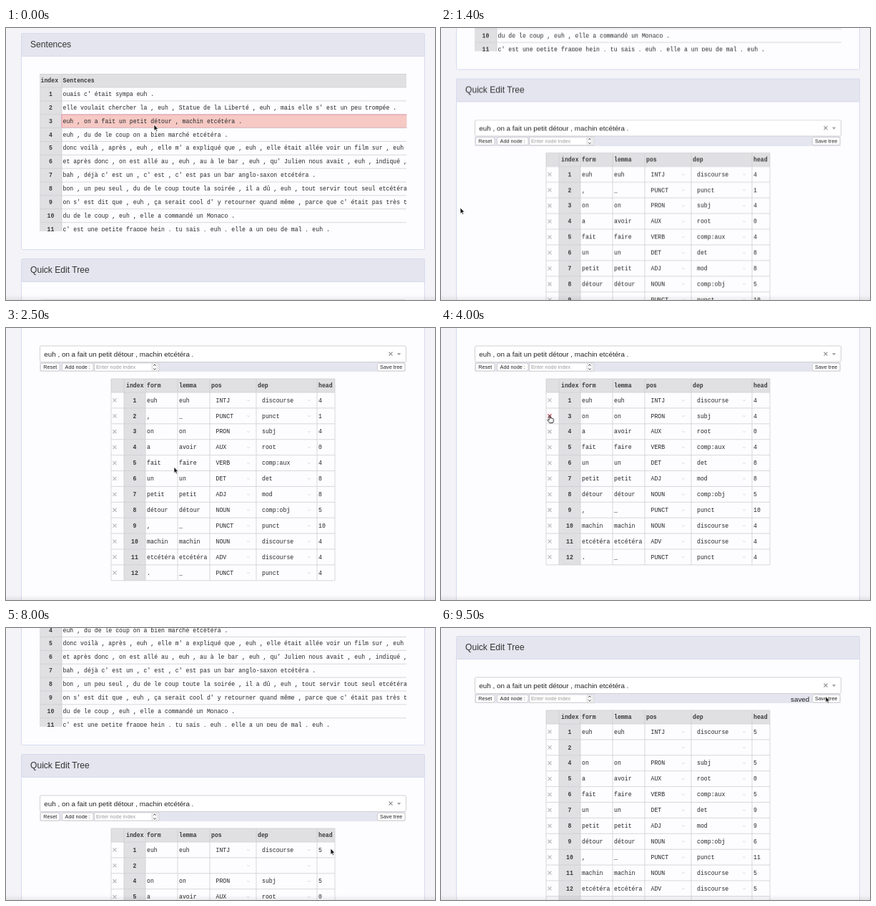
Animation, 600 px wide and 380 px high, one loop 10 s. Source, as an HTML page:

```html
<!DOCTYPE html>
<html lang="fr">
<head>
<meta charset="utf-8">
<title>Quick Edit Tree</title>
<style>
  html, body { margin: 0; width: 100%; height: 100%; overflow: hidden; background: #f4f3f7; }
  svg { display: block; width: 600px; height: 380px; }
  text { font: 8.2px "Liberation Mono", "Courier New", monospace; fill: #262626; white-space: pre; }
  .bold { font-weight: bold; fill: #3a3a3a; }
  .mid { text-anchor: middle; }
  .title { font: 12.1px "Liberation Sans", Arial, sans-serif; fill: #333; }
  .value { font: 9.85px "Liberation Sans", Arial, sans-serif; fill: #222; }
  .small { font: 7.3px "Liberation Sans", Arial, sans-serif; fill: #222; }
  .hint { fill: #999; }
  .panel { fill: #fdfcfe; stroke: #d6daee; }
  .head { fill: #e4e5ee; stroke: #d6daee; }
  .gray { fill: #e0dfe2; }
  .line { fill: none; stroke: #cfced2; stroke-width: .8; }
  .box { fill: #fff; stroke: #c6c6ca; stroke-width: .8; }
  .cross { fill: none; stroke: #b9b8bb; stroke-width: 1.2; }
  .caret { fill: none; stroke: #d5d4d8; stroke-width: .8; }
  .dark { stroke: #8e8e92; }
  .red { stroke: #d8485c; }
</style>
</head>
<body>
<svg id="stage" viewBox="0 0 600 380"></svg>
<script>
const sentences = [
  "ouais c' était sympa euh .",
  "elle voulait chercher la , euh , Statue de la Liberté , euh , mais elle s' est un peu trompée .",
  "euh , on a fait un petit détour , machin etcétéra .",
  "euh , du de le coup on a bien marché etcétéra .",
  "donc voilà , après , euh , elle m' a expliqué que , euh , elle était allée voir un film sur , euh",
  "et après donc , on est allé au , euh , au à le bar , euh , qu' Julien nous avait , euh , indiqué ,",
  "bah , déjà c' est un , c' est , c' est pas un bar anglo-saxon etcétéra .",
  "bon , un peu seul , du de le coup toute la soirée , il a dû , euh , tout servir tout seul etcétéra",
  "on s' est dit que , euh , ça serait cool d' y retourner quand même , parce que c' était pas très t",
  "du de le coup , euh , elle a commandé un Monaco .",
  "c' est une petite frappe hein , tu sais , euh , elle a un peu de mal , euh ."
];

// index, form, lemma, pos, dep, head
const nodes = `1 euh euh INTJ discourse 4
2 , _ PUNCT punct 1
3 on on PRON subj 4
4 a avoir AUX root 0
5 fait faire VERB comp:aux 4
6 un un DET det 8
7 petit petit ADJ mod 8
8 détour détour NOUN comp:obj 5
9 , _ PUNCT punct 10
10 machin machin NOUN discourse 4
11 etcétéra etcétéra ADV discourse 4
12 . _ PUNCT punct 4`.split("\n").map(row => row.split(" "));

const shift = n => +n > 1 ? +n + 1 : n;
const removed = nodes.filter(node => node[0] !== "2");
const inserted = removed.map(([index, ...rest]) => [shift(index), ...rest.slice(0, 4), shift(rest[4])]);
inserted.splice(1, 0, [2, "", "", "", "", ""]);

const text = (x, y, str, cls = "") => `<text x="${x}" y="${y}" class="${cls}">${str}</text>`;
const rect = (x, y, w, h, cls, r = 0) =>
  `<rect x="${x}" y="${y}" width="${w}" height="${h}" rx="${r}" class="${cls}"/>`;
const path = (d, cls, extra = "") => `<path d="${d}" class="${cls}" ${extra}/>`;
const group = (id, body) => `<g id="${id}">${body}</g>`;
const cross = (x, y, cls = "") => path(`M${x - 2.5} ${y - 2.5}l5 5m0-5l-5 5`, "cross " + cls);
const button = (x, w, label) =>
  rect(x, 404.2, w, 10.8, "box", 2.5) + text(x + w / 2, 412.3, label, "small mid");

function panel(y, bottom, title) {
  return rect(21.5, y + .5, 564, bottom - y, "panel", 2) +
    rect(21.5, y + .5, 564, 32, "head", 2) + text(34, y + 20.3, title, "title");
}

function sentenceTable() {
  const pitch = 18.87;
  let out = rect(47, 64, 513, 19, "gray") + rect(47, 83, 31, 201, "gray") +
    text(48.5, 76, "index", "bold") + text(79.5, 76, "Sentences", "bold") +
    path("M47 64.4H560M78 64V284", "line");
  sentences.forEach((sentence, i) => {
    const y = 83 + i * pitch;
    out += path(`M47 ${y}H560`, "line") +
      (i === 2 ? `<rect x="78" y="${y + .3}" width="490" height="${pitch - .6}" fill="#f6c9c4" stroke="#e58fae" stroke-width=".9"/>` : "") +
      text(62.5, y + 12, i + 1, "bold mid") + text(79.5, y + 12, sentence);
  });
  return `<g clip-path="url(#list)">${out}</g>`;
}

function treeTable(id, rows) {
  const pitch = 21.9, top = 445, bottom = top + rows.length * pitch;
  const columns = [147, 165, 195, 240, 285, 350, 435, 460];
  const heads = [[168, "index"], [197, "form"], [242, "lemma"], [287, "pos"], [352, "dep"], [437, "head"]];
  const cellX = [180, 197, 242, 293.5, 358, 437];
  let out = rect(147, 426, 313, 19, "gray") + rect(165, 445, 30, bottom - top, "gray") +
    heads.map(([x, label]) => text(x, 438.2, label, "bold")).join("") +
    columns.map(x => path(`M${x} 426V${bottom}`, "line")).join("") +
    path(`M147 426H460M147 ${bottom}H460`, "line");
  rows.forEach((row, i) => {
    const y = top + (i + .5) * pitch;
    out += path(`M147 ${top + i * pitch}H460`, "line") + cross(152, y) +
      row.map((cell, k) => text(cellX[k], y + 2.7, cell, k ? "" : "bold mid")).join("") +
      [339, 424].map(x => path(`M${x - 2} ${y - .7}l2 1.8 2-1.8`, "caret")).join("");
  });
  return group(id, out);
}

const toolbar =
  rect(47, 403, 512, 13, "head") .replace("/>", ' style="stroke:none"/>') +
  rect(47.5, 380, 512, 22.5, "box", 2) +
  text(53.3, 394.5, sentences[2], "value") +
  cross(538, 391.2, "dark") + `<path d="M546.8 390.2h5.6l-2.8 2.9z" fill="#999"/>` +
  button(48.4, 26.6, "Reset") + button(78.4, 43.6, "Add node :") + button(519.4, 38.6, "Save tree") +
  rect(123.8, 404, 90, 11.2, "box") + rect(204.2, 403.8, 7.4, 11.6, "box", 3) +
  `<path d="M206.2 407.8l1.7-2 1.7 2M206.2 411.4l1.7 2 1.7-2" fill="none" stroke="#333" stroke-width=".9"/>` +
  group("hint", text(126, 412.3, "Enter node index", "small hint")) +
  group("typed", text(126.5, 412.3, "2", "small")) +
  group("pressed", `<rect x="78" y="403.8" width="44.4" height="11.6" rx="2.5" fill="url(#blue)"/>` +
    text(100.2, 412.3, "Add node :", "small mid").replace("<text", '<text style="fill:#fff"')) +
  group("saved", text(489, 413.6, "saved", "value"));

const ink = 'fill="#111" stroke="#fff" stroke-width=".7"';
const pointer =
  group("arrow", path("M0 0V8.4L1.9 6.7 3.2 9.6 4.6 9 3.3 6.2H5.9Z", "", ink)) +
  group("hand", path("M0 .8Q.8-.4 1.6.8V4Q2.6 3.2 3.2 4.2 4.2 3.6 4.7 4.6 6 4.2 6.1 5.6V8L5 10.6H.6L-2.4 6.6Q-2.2 5.2 0 6.6Z", "",
    'fill="#fff" stroke="#111" stroke-width=".9"')) +
  group("beam", path("M-1.6 0Q0 0 0 1.2 0 0 1.6 0M0 1V9M-1.6 10Q0 10 0 8.8 0 10 1.6 10", "",
    'fill="none" stroke="#222" stroke-width=".8"'));

document.getElementById("stage").innerHTML = `
  <defs>
    <clipPath id="list"><rect x="47" y="64" width="513.5" height="220"/></clipPath>
    <linearGradient id="blue" x2="0" y2="1"><stop stop-color="#5a9cf6"/><stop offset="1" stop-color="#1e68ea"/></linearGradient>
    <linearGradient id="fade" x2="0" y2="1"><stop stop-opacity="0"/><stop offset="1" stop-opacity=".07"/></linearGradient>
  </defs>
  <rect width="600" height="380" fill="#f4f3f7"/>` +
  group("page",
    panel(7, 309, "Sentences") + sentenceTable() +
    panel(322, 441, "Quick Edit Tree") +
    group("open", panel(322, 1000, "Quick Edit Tree")) + toolbar +
    treeTable("full", nodes) + treeTable("cut", removed) + treeTable("renumbered", inserted) +
    group("hover", cross(152, 477.9, "red"))) +
  `<rect y="373" width="600" height="7" fill="url(#fade)"/>` +
  group("cursor", pointer);

// Keys are [percent of the loop, value]; 1% is one 100 ms step.
const sheet = document.head.appendChild(document.createElement("style"));
function track(id, keys, css) {
  const all = [...keys, [100, keys[keys.length - 1][1]]];
  const frames = all.map(([at, value], i) => {
    const steps = i < keys.length ? all[i + 1][0] - at : 1;
    return `${at}%{${css(value)};animation-timing-function:steps(${steps})}`;
  });
  sheet.textContent += `@keyframes ${id}{${frames.join("")}}#${id}{animation:${id} 10s infinite}\n`;
}
function show(id, ...spans) {
  const frames = ["0%{opacity:0}"];
  for (const [from, to] of spans) frames.push(`${from}%{opacity:1}`, `${to}%{opacity:${to === 100 ? 1 : 0}}`);
  if (spans[spans.length - 1][1] < 100) frames.push("100%{opacity:0}");
  sheet.textContent += `@keyframes ${id}{${frames.join("")}}#${id}{animation:${id} 10s step-end infinite}\n`;
}

track("page", [[0, 0], [9, 0], [11, 136], [17, 367], [18, 369], [20, 355], [65, 355], [66, 74],
  [76, 74], [80, 146], [87, 311]], y => `transform:translateY(${-y}px)`);

track("cursor", [[0, [207, 135]], [9, [27, 251]], [21, [27, 251]], [26, [287, 180]], [29, [200, 117]],
  [31, [151.3, 122]], [40, [151.3, 122]], [44, [365, 268]], [49, [147, 51]], [57, [147, 51]],
  [63, [111.7, 55]], [69, [111.7, 55]], [75, [454, 308]], [87, [454, 308]], [88, [440, 333]],
  [90, [83, 230]], [92, [250, 26]], [95, [538, 95.5]]], ([x, y]) => `transform:translate(${x}px,${y}px)`);

show("full", [0, 35]);
show("cut", [35, 66]);
show("renumbered", [70, 100]);
show("open", [0, 66], [70, 100]);
show("hover", [31, 41]);
show("hint", [0, 53], [66, 100]);
show("typed", [53, 66]);
show("pressed", [63, 66]);
show("saved", [95, 100]);
show("arrow", [0, 31], [41, 49], [60, 100]);
show("hand", [31, 41]);
show("beam", [49, 60]);
</script>
</body>
</html>
```
